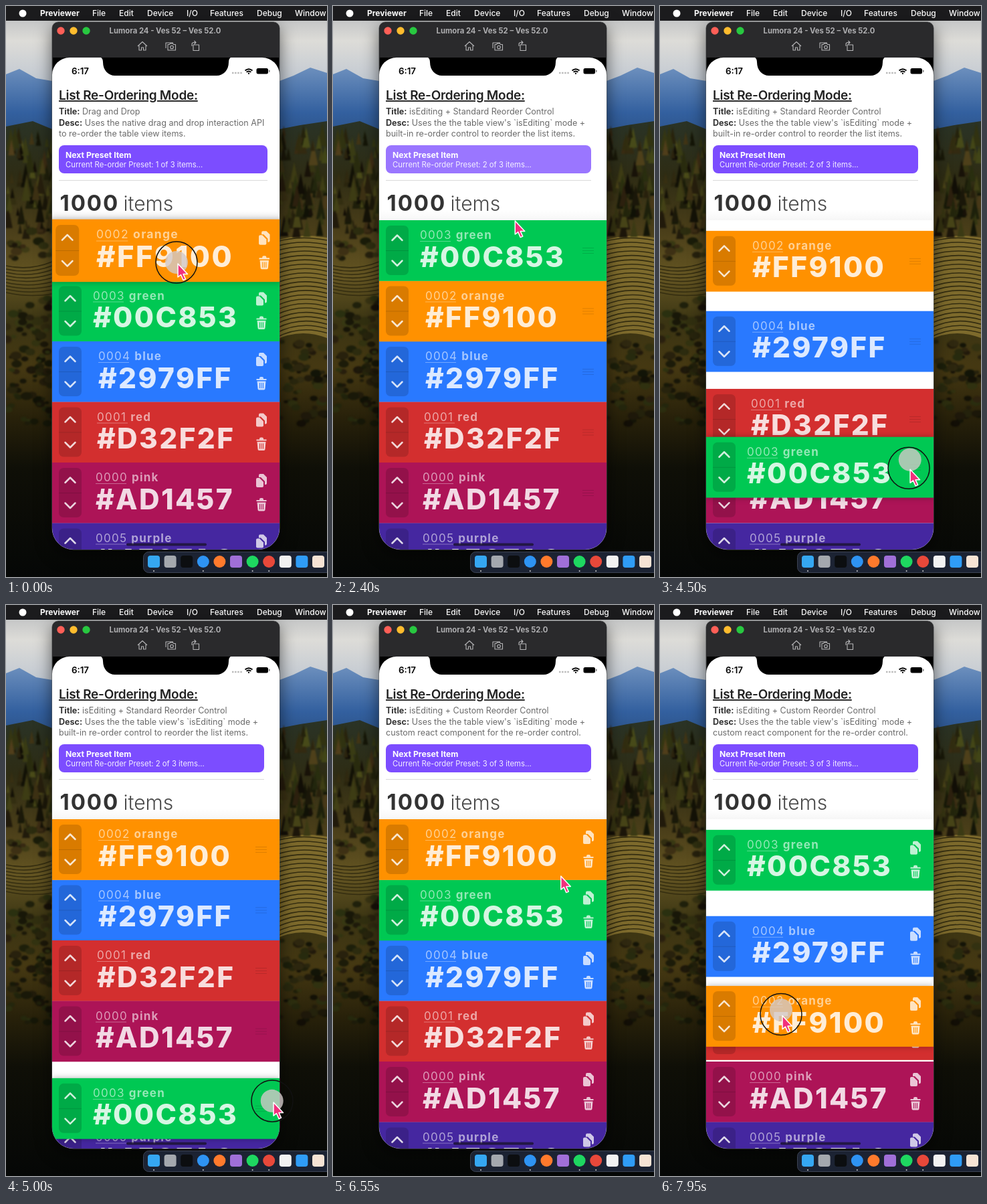
Recreate the animation shown at these times as an HTML page. Size 480 by 853 pixels, loop 8 s.

```html
<!DOCTYPE html>
<html lang="en">
<head>
<meta charset="utf-8">
<title>List re-ordering</title>
<style>
  html, body { margin: 0; width: 100%; height: 100%; overflow: hidden; background: #0a0d0a; }
  svg { display: block; width: 100%; height: 100%; font-family: Inter, "Open Sans", sans-serif; }
  text { white-space: pre; }
  .menu { font-size: 12px; fill: #fff; font-weight: 500; }
  .bold { font-weight: 700; }
  .body { font-size: 12.55px; fill: #6b6b6b; }
  .body .bold { fill: #333; }
  .label { font-size: 17px; letter-spacing: 1.25px; fill: #fff; fill-opacity: .58; }
  .hex { font-size: 42.3px; font-weight: 800; letter-spacing: 2.4px; fill: #fff; fill-opacity: .84; }
  .handle, .editing .icons { display: none; }
  .editing .handle { display: inline; }
  #window { filter: drop-shadow(0 8px 12px rgba(0,0,0,.55)); }
  #trees { filter: blur(.9px); }
</style>
</head>
<body>
<svg viewBox="0 0 480 853">
  <defs>
    <linearGradient id="sky" x2="0" y2="1">
      <stop stop-color="#b4b7ba"/><stop offset=".4" stop-color="#dddcd8"/><stop offset="1" stop-color="#b9c3d0"/>
    </linearGradient>
    <linearGradient id="hills" x2="0" y2="1">
      <stop stop-color="#6c8fbd"/><stop offset=".4" stop-color="#33609f"/><stop offset="1" stop-color="#1f3a60"/>
    </linearGradient>
    <linearGradient id="land" x2="0" y2="1">
      <stop stop-color="#2a3326"/><stop offset=".12" stop-color="#2e2c14"/><stop offset=".24" stop-color="#4a3e19"/>
      <stop offset=".34" stop-color="#645522"/><stop offset=".44" stop-color="#3a3413"/><stop offset=".54" stop-color="#453812"/>
      <stop offset=".65" stop-color="#28210a"/><stop offset=".76" stop-color="#0f0f07"/><stop offset="1" stop-color="#050706"/>
    </linearGradient>
    <linearGradient id="fade" x2="0" y2="1">
      <stop stop-color="#000" stop-opacity="0"/><stop offset="1" stop-color="#000" stop-opacity=".035"/>
    </linearGradient>
    <clipPath id="screen"><path d="M69 103a26 26 0 0 1 26-26H383a26 26 0 0 1 26 26V780a32 32 0 0 1-32 32H101a32 32 0 0 1-32-32Z"/></clipPath>
  </defs>

  <rect width="480" height="130" fill="url(#sky)"/>
  <path d="M0 102L20 94L45 108L69 112H409L430 104L455 92L480 100V260H0Z" fill="url(#hills)"/>
  <path d="M0 180L40 172L69 184H409L440 178L480 172V853H0Z" fill="url(#land)"/>
  <path d="M400 352Q440 338 480 346V496Q440 480 400 500Z" fill="#7d6a2c"/>
  <g id="vines" fill="none" stroke="#342d10" stroke-width="1.6"></g>
  <g id="trees"></g>

  <rect width="480" height="22" fill="#1b1b1d"/>
  <circle cx="25" cy="11" r="5.5" fill="#fff"/>
  <g id="menu"></g>

  <path id="window" d="M69 33a9 9 0 0 1 9-9H400a9 9 0 0 1 9 9V780a32 32 0 0 1-32 32H101a32 32 0 0 1-32-32Z" stroke="#555658"/>
  <path d="M69.5 77V33a8.5 8.5 0 0 1 8.5-8.5H400a8.5 8.5 0 0 1 8.5 8.5V77Z" fill="#2a2a2c"/>
  <circle cx="82" cy="37" r="5.7" fill="#ff5f57"/>
  <circle cx="101" cy="37" r="5.7" fill="#febc2e"/>
  <circle cx="120" cy="37" r="5.7" fill="#28c840"/>
  <text x="238" y="41" text-anchor="middle" font-size="11.3" class="bold" fill="#aeaeb0">Lumora 24 - Ves 52 – Ves 52.0</text>
  <g fill="none" stroke="#b4b4b6" stroke-width="1.1" stroke-linejoin="round">
    <path d="M197 60l7-6.5l7 6.5M199 59v7h3.5v-4h3v4h3.5v-7"/>
    <path d="M239 63v-8h11M242 57.5h2.5l1-1.5h4l1 1.5h3v8.5h-11.5Z"/><circle cx="248" cy="61.5" r="2.3"/>
    <path d="M280 58h8.5v8.5h-8.5ZM278 60v-3q0-2.5 3-2.5h2M281.5 52l2.5 2.5l-2.5 2.5"/>
  </g>

  <g clip-path="url(#screen)">
    <rect x="69" y="77" width="340" height="736" fill="#fff"/>
    <path d="M138 76c5 0 7 3 7 8c0 12 8 20 18 20H315c10 0 18-8 18-20c0-5 2-8 7-8Z"/>
    <text x="98" y="102" font-size="13.3" font-weight="600">6:17</text>
    <path d="M338 100h15" stroke="#bbb" stroke-width="2.5" stroke-dasharray="2.5 1.6"/>
    <g fill="none" stroke="#000" stroke-width="1.9">
      <path d="M357.5 96.5q5.5-4.6 11 0M359.6 98.8q3.4-2.8 6.8 0"/><path d="M362 100.8h2"/>
    </g>
    <rect x="374.5" y="93" width="17.5" height="8.5" rx="2.5"/><rect x="393" y="95.5" width="1.5" height="3.5" rx=".7" fill="#777"/>

    <text x="79" y="140" font-size="19" font-weight="600" letter-spacing="-.28" fill="#222" text-decoration="underline">List Re-Ordering Mode:</text>
    <text x="79" y="162" class="body"><tspan class="bold">Title:</tspan> <tspan id="title"></tspan></text>
    <text x="79" y="179" class="body"><tspan class="bold">Desc:</tspan> <tspan id="desc1"></tspan></text>
    <text x="79" y="195" class="body" id="desc2"></text>
    <g id="button">
      <rect id="buttonBox" x="79" y="208" height="42" rx="8" fill="#7c4dff"/>
      <text x="89" y="227" font-size="12.2" class="bold" fill="#fff">Next Preset Item</text>
      <text id="preset" x="89" y="241" font-size="11.3" fill="#fff" fill-opacity=".9"></text>
    </g>
    <rect id="divider" x="79" y="260" height="1" fill="#dadada"/>
    <text x="80.5" y="306" font-size="33" font-weight="700" letter-spacing="1.9" fill="#333">1000</text>
    <text x="175.5" y="306" font-size="30" font-weight="300" fill="#4a4a4a">items</text>
    <rect x="69" y="304" width="340" height="16" fill="url(#fade)"/>
    <g id="list"></g>
    <rect x="180" y="802.5" width="120" height="4" rx="2" fill="#14101f" fill-opacity=".7"/>
  </g>

  <rect x="205.5" y="815.5" width="290" height="31" rx="8" fill="#1c2333" stroke="#3c4352"/>
  <g id="dock"></g>

  <g id="press">
    <circle id="touch" r="17" fill="#d2cac8" fill-opacity=".8"/>
    <circle id="ring" r="31" fill="none" stroke="#111" stroke-width="1.5"/>
  </g>
  <path id="arrow" d="M0 0V20L4.5 16.5L8 24.5L11.5 23L8 15.5H14.5Z" fill="#f2307c" stroke="#fff" stroke-width="1.5" stroke-linejoin="round"/>
</svg>

<script>
const LOOP = 8000, ROW = 90.5, TOP = 320;
const $ = id => document.getElementById(id);
const lerp = (a, b, k) => a + (b - a) * k;
const clamp = k => Math.max(0, Math.min(1, k));
const smooth = k => k * k * (3 - 2 * k);
const ramp = (t, a, b) => smooth(clamp((t - a) / (b - a)));
const pulse = (t, on, off, fadeIn, fadeOut) => ramp(t, on, on + fadeIn) * (1 - ramp(t, off, off + fadeOut));

// ---- Static scenery, menu and dock ----
let seed = 7;
const random = () => (seed = seed * 16807 % 2147483647) / 2147483647;
const repeat = (count, draw) => Array.from({ length: count }, (_, i) => draw(i)).join('');

$('vines').innerHTML =
  repeat(22, i => `<path d="M405 ${352 + i * 6.8}Q440 ${342 + i * 6.4} 480 ${350 + i * 6.6}"/>`) +
  repeat(9, i => `<path d="M0 ${388 + i * 5}Q35 ${396 + i * 5} 69 ${382 + i * 6}"/>`);

$('trees').innerHTML = repeat(420, () => {
  const right = random() < .5, depth = random(), size = 3 + random() * 6;
  const x = (right ? 409 : 0) + random() * 71, y = 186 + depth * 440;
  if (right ? y > 335 && y < 500 : y > 380 && y < 435) return '';
  const color = `hsl(${36 + random() * 34} 50% ${lerp(4 + random() * 18, 5, depth * .6)}%)`;
  return y < 335
    ? `<path d="M${x} ${y - size * 2}l${size * .8} ${size * 4}h${-size * 1.6}Z" fill="${color}"/>`
    : `<ellipse cx="${x}" cy="${y}" rx="${size}" ry="${size * .7}" fill="${color}"/>`;
});

const menu = { Previewer: 51, File: 129, Edit: 169, Device: 211, 'I/O': 270, Features: 305, Debug: 375, Window: 432 };
$('menu').innerHTML = Object.entries(menu).map(([name, x], i) =>
  `<text x="${x}" y="15" class="menu ${i ? '' : 'bold'}">${name}</text>`).join('');

const dockColors = ['#35a7f2', '#a4a8ae', '#0c0e10', '#2e93f3', '#ff7a2c', '#a06fd8', '#1ed760', '#e8483a', '#f2f2f2', '#2f9cf6', '#f6e3d4'];
const roundIcons = [3, 4, 6, 7], runningIcons = [0, 3, 6, 7];
$('dock').innerHTML = dockColors.map((color, i) => {
  const x = 221 + i * 24.6;
  return `<rect x="${x - 9}" y="821" width="18" height="18" rx="${roundIcons.includes(i) ? 9 : 4}" fill="${color}"/>` +
    (runningIcons.includes(i) ? `<circle cx="${x}" cy="844" r="1" fill="#ccc"/>` : '');
}).join('');

// ---- List rows ----
const rowSvg = (id, name, hex, x) => `
  <rect x="69" width="340" height="${ROW + .3}" fill="${hex}"/>
  <rect x="79" y="8" width="34" height="74" rx="7" fill-opacity=".15"/>
  <path d="M79 45.5h34" stroke="#000" stroke-opacity=".13"/>
  <path d="M88.5 30l7.5-7.5l7.5 7.5M88.5 60.5l7.5 7.5l7.5-7.5" fill="none" stroke="#fff" stroke-opacity=".82" stroke-width="2.5" stroke-linecap="round" stroke-linejoin="round"/>
  <text x="${x}" y="28" class="label">${id} <tspan class="bold">${name}</tspan></text>
  <path d="M${x} 31.5h46" stroke="#fff" stroke-opacity=".35"/>
  <text x="${x}" y="69.5" class="hex">${hex}</text>
  <g class="icons" fill="#fff" fill-opacity=".75">
    <path d="M380 17h5l5 5v9q0 2-2 2h-1v-5l-6-6h-3v-3q0-2 2-2Z"/>
    <path d="M376 23h3l6 6v6q0 2-2 2h-7q-2 0-2-2v-10q0-2 2-2Z"/>
    <path d="M374.5 56h4.5v-1q0-2 2-2h2q2 0 2 2v1h4.5v2h-15Z"/>
    <path d="M375.5 59.5h13l-1 11q0 2-2 2h-7q-2 0-2-2ZM379 62v8h1v-8ZM381.5 62v8h1v-8ZM384 62v8h1v-8Z" fill-rule="evenodd"/>
  </g>
  <path class="handle" d="M373 41.5h17M373 45.5h17M373 49.5h17" stroke="#000" stroke-opacity=".13"/>`;

const rows = {};
for (const [id, name, hex, x] of [
  ['0002', 'orange', '#FF9100', 138], ['0003', 'green', '#00C853', 130], ['0004', 'blue', '#2979FF', 138],
  ['0001', 'red', '#D32F2F', 136], ['0000', 'pink', '#AD1457', 134], ['0005', 'purple', '#4527A0', 134],
]) {
  const row = document.createElementNS('http://www.w3.org/2000/svg', 'g');
  row.innerHTML = rowSvg(id, name, hex, x);
  $('list').append(rows[name] = row);
}

// ---- Modes: each one drags its first row and drops it in the second slot ----
const rest = ['blue', 'red', 'pink', 'purple'];
const modes = [
  { title: 'Drag and Drop', from: 0, width: 312,
    desc: ['Uses the native drag and drop interaction API', 'to re-order the table view items.'],
    order: ['orange', 'green', ...rest], start: 0, end: 1700, grab: 47, bias: 30, preview: true },
  { title: 'isEditing + Standard Reorder Control', from: 2300, width: 307,
    desc: ["Uses the the table view's `isEditing` mode +", 'built-in re-order control to reorder the list items.'],
    order: ['green', 'orange', ...rest], start: 2900, end: 5800, grab: 34, bias: 0 },
  { title: 'isEditing + Custom Reorder Control', from: 6300, width: 307,
    desc: ["Uses the the table view's `isEditing` mode +", 'custom react component for the re-order control.'],
    order: ['orange', 'green', ...rest], start: 7250, end: 9000, grab: 36, bias: 0 },
];

// Pointer path: time, x, y
const path = [
  [0, 255, 383], [100, 255, 385], [250, 257, 425], [420, 260, 500], [620, 263, 566], [800, 264, 578],
  [1000, 265, 580], [1150, 266, 574], [1400, 266, 510], [1620, 264, 452], [1750, 264, 448],
  [2100, 262, 238], [2320, 264, 245], [2400, 270, 319], [2800, 372, 350], [3150, 380, 358],
  [3450, 384, 470], [3650, 386, 540], [3900, 384, 450], [4120, 380, 362], [4210, 378, 366],
  [4277, 376, 399], [4342, 374, 490], [4402, 373, 580], [4492, 374, 676], [4500, 372, 690], [4620, 382, 733],
  [5000, 398, 741], [5240, 402, 732], [5330, 405, 671], [5394, 406, 580], [5442, 406, 482], [5450, 410, 464],
  [5520, 414, 430], [5620, 417, 436], [5800, 410, 444], [5960, 355, 330], [6150, 330, 236],
  [6330, 331, 240], [6550, 339, 403], [6800, 290, 425], [7150, 184, 362], [7620, 181, 358],
  [7729, 181, 402], [7818, 181, 493], [7917, 181, 583], [7950, 181, 611], [8000, 181, 640],
];
const presses = [[-200, 1700], [2120, 2290], [2880, 5800], [6170, 6300], [7220, 9000]];

function pointer(t) {
  const i = path.findIndex(key => key[0] >= t);
  if (i <= 0) return path[i ? path.length - 1 : 0].slice(1);
  const [a, b] = [path[i - 1], path[i]], k = (t - a[0]) / (b[0] - a[0]);
  return [lerp(a[1], b[1], k), lerp(a[2], b[2], k)];
}
const touchPoint = t => pointer(t - 8);

function dragTop(drag, t) {
  if (t <= drag.start) return TOP;
  const held = touchPoint(Math.min(t, drag.end))[1] - drag.grab;
  const lifted = lerp(TOP, held, ramp(t, drag.start, drag.start + 200));
  return lerp(lifted, TOP + ROW, ramp(t, drag.end, drag.end + 250));
}

// A row slides up over 300 ms once the dragged row has passed its midpoint.
function slide(drag, slot, t) {
  const threshold = TOP + ROW * (slot - .5) - drag.bias;
  let passed = 0;
  for (let ago = 5; ago < 300; ago += 10) passed += dragTop(drag, t - ago) > threshold;
  return smooth(passed / 30);
}

const move = (node, x, y) => node.setAttribute('transform', `translate(${x} ${y})`);

function drawList(mode, t) {
  const [dragged, ...others] = mode.order.map(name => rows[name]);
  others.forEach((row, i) => {
    const slot = i + 1;
    move(row, 0, TOP + ROW * (slot - (slot < 5 ? slide(mode, slot, t) : 0)));
    row.style.filter = row.style.opacity = '';
  });

  const drop = ramp(t, mode.end, mode.end + 250);
  const hold = (mode.preview ? 1 : ramp(t, mode.start, mode.start + 150)) * (1 - drop);
  const scale = mode.preview ? 1 + .03 * hold : 1;
  const dx = mode.preview ? (touchPoint(Math.min(t, mode.end))[0] - 255) * (1 - drop) : 0;
  const y = dragTop(mode, t) + ROW / 2;
  dragged.setAttribute('transform', `translate(${239 + dx} ${y}) scale(${scale}) translate(-239 ${-ROW / 2})`);
  dragged.style.opacity = mode.preview ? 1 - .18 * hold * ramp(t, 0, 250) : '';
  dragged.style.filter = hold ? `drop-shadow(0 0 5px rgba(0,0,0,${.3 * hold}))` : '';
  if ($('list').lastChild !== dragged) $('list').append(dragged);
}

function drawHeader(mode, index, t) {
  $('title').textContent = mode.title;
  $('desc1').textContent = mode.desc[0];
  $('desc2').textContent = mode.desc[1];
  $('preset').textContent = `Current Re-order Preset: ${index + 1} of 3 items...`;
  $('buttonBox').setAttribute('width', mode.width);
  $('divider').setAttribute('width', mode.width);
  const pressed = pulse(t, 2130, 2360, 60, 250) + pulse(t, 6180, 6300, 60, 220);
  $('button').style.opacity = 1 - .25 * pressed;
}

function drawPointer(t) {
  const [x, y] = pointer(t);
  move($('ring'), x, y);
  move($('touch'), ...touchPoint(t));
  move($('arrow'), x + 2, y + 2);
  $('press').style.opacity = Math.max(...presses.map(([on, off]) => pulse(t, on, off, 80, 100)));
}

function frame(now) {
  const t = now % LOOP;
  const index = modes.findLastIndex(mode => t >= mode.from), mode = modes[index];
  $('list').setAttribute('class', index === 1 ? 'editing' : '');
  drawHeader(mode, index, t);
  drawList(mode, t);
  drawPointer(t);
  requestAnimationFrame(frame);
}
requestAnimationFrame(frame);
</script>
</body>
</html>
```
